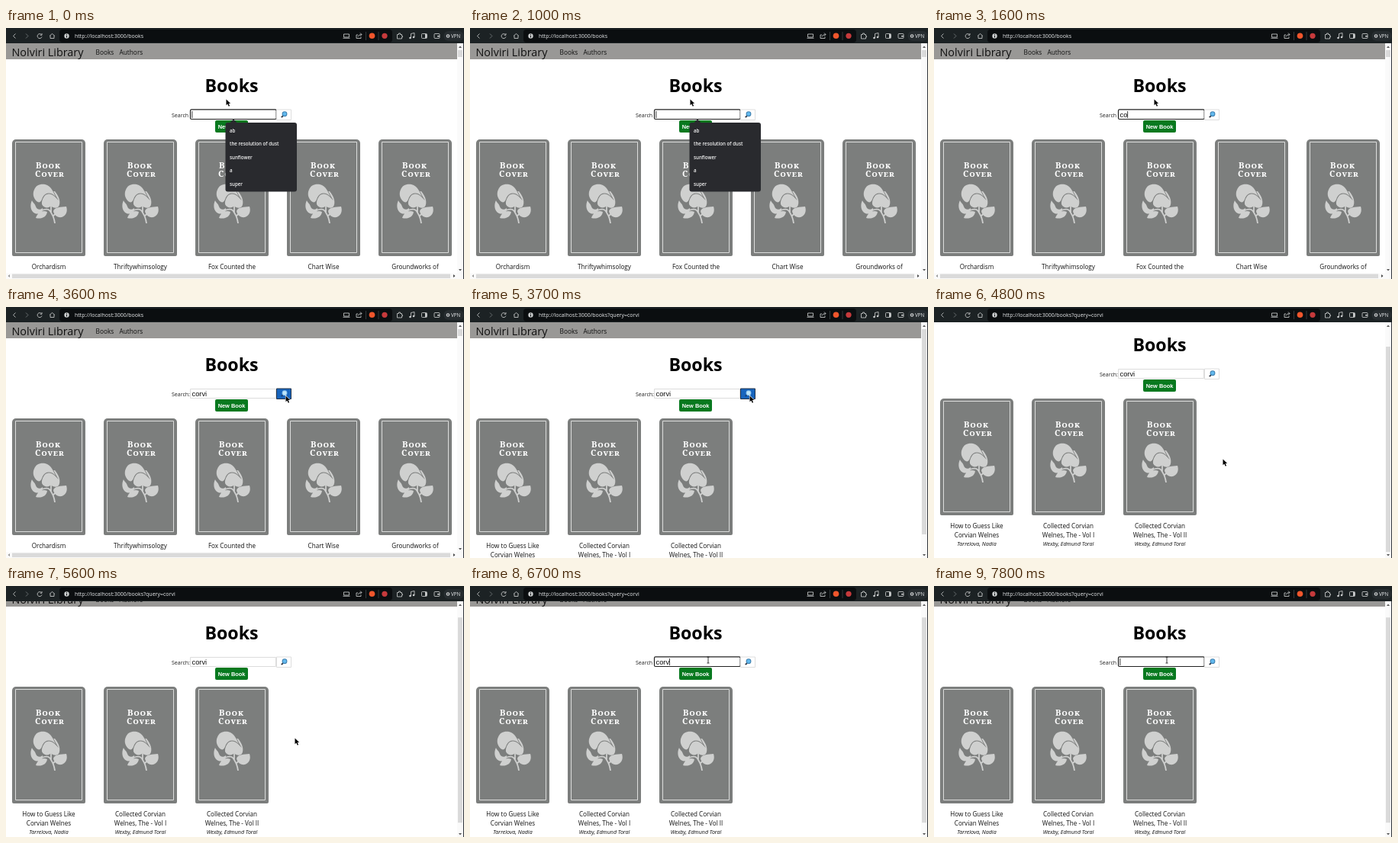
Animation, 600 px wide and 329 px high, one loop 8 s. Source, as an HTML page with a canvas:

```html
<!DOCTYPE html>
<html lang="en">
<head>
<meta charset="utf-8">
<title>Library search</title>
<style>
  html, body { margin: 0; height: 100%; overflow: hidden; background: #fff; }
  canvas { display: block; }
</style>
</head>
<body>
<canvas id="stage" width="600" height="329"></canvas>
<script>
const ctx = document.getElementById('stage').getContext('2d');
const SANS = '"Open Sans", "Noto Sans", sans-serif';
const ARIAL = '"Liberation Sans", sans-serif';
const SERIF = '"Noto Serif", serif';
const LOOP = 8000;
const QUERY = 'corvi';

const allBooks = [['Orchardism'], ['Thriftywhimsology'], ['Fox Counted the'], ['Chart Wise'], ['Groundworks of']];
const foundBooks = [
  ['How to Guess Like', 'Corvian Welnes', 'Tarrelova, Nadia'],
  ['Collected Corvian', 'Welnes, The - Vol I', 'Wexby, Edmund Toral'],
  ['Collected Corvian', 'Welnes, The - Vol II', 'Wexby, Edmund Toral'],
];
const suggestions = ['ab', 'the resolution of dust', 'sunflower', 'a', 'super'];

const heartLeaf = 'M64 214C70 221 72 229 69 234C66 237 61 236 59 233C56 237 49 236 47 231C46 224 52 217 57 214Z';
const curledLeaf = 'M37 212C39 205 48 203 54 206C61 210 62 216 65 221C59 215 52 215 48 222C46 228 44 230 40 227C35 222 35 216 37 212Z';
const lowLeaves = `M34 226C31 232 32 240 38 243C44 245 49 241 48 236C45 239 40 238 39 234C38 230 35 229 34 226Z
  M54 241C47 238 41 243 39 249C46 251 53 248 54 241Z
  M62 240C64 234 72 235 79 234C81 240 79 246 73 248C67 249 63 245 62 240Z`;
const stem = 'M47 239Q56 235 59 242Q63 248 64 256M59 233V242M62 246L68 241';
const arrow = new Path2D('M0 0V7.8L1.8 6.1L3.3 9.2L4.6 8.5L3.2 5.6H5.6Z');

function rect(x, y, w, h, fill, radius = 0, stroke, line = 1) {
  ctx.beginPath();
  ctx.roundRect(x, y, w, h, radius);
  if (fill) { ctx.fillStyle = fill; ctx.fill(); }
  if (stroke) { ctx.strokeStyle = stroke; ctx.lineWidth = line; ctx.stroke(); }
}

function text(str, x, y, font, color = '#111', align = 'left') {
  ctx.font = font;
  ctx.fillStyle = color;
  ctx.textAlign = align;
  ctx.fillText(str, x, y);
}

function stroke(d, color, width = 1) {
  ctx.strokeStyle = color;
  ctx.lineWidth = width;
  ctx.stroke(typeof d === 'string' ? new Path2D(d) : d);
}

function fill(d, color) {
  ctx.fillStyle = color;
  ctx.fill(typeof d === 'string' ? new Path2D(d) : d);
}

function dot(x, y, r, color) {
  ctx.beginPath();
  ctx.arc(x, y, r, 0, 7);
  ctx.fillStyle = color;
  ctx.fill();
}

// Value of the last [time, value] step already reached
const stepAt = (t, steps) => steps.reduce((v, [at, next]) => t >= at ? next : v, undefined);

function glide(t, start, end, from, to) {
  const p = Math.min(1, Math.max(0, (t - start) / (end - start)));
  return from.map((v, i) => v + (to[i] - v) * p);
}

function pointerAt(t) {
  if (t < 4100) return glide(t, 3000, 3400, [288.5, 93.5], [366.5, 116.5]);
  if (t < 5700) return glide(t, 4100, 4400, [366.5, 116.5], [378.5, 199.5]);
  if (t < 7800) return glide(t, 5700, 6200, [378.5, 199.5], [312, 97]);
  return [305, 97];
}

function sceneAt(t) {
  const typed = stepAt(t, [[0, 0], [1600, 2], [1700, 3], [1900, 4], [2000, 5],
    [6700, 4], [6800, 3], [6900, 1], [7000, 0]]);
  return {
    results: t >= 3700,
    value: QUERY.slice(0, typed),
    focused: t < 3600 || t >= 6200,
    caret: t < 3600 || (t >= 6200 && t < 7000) || t >= 7800,
    suggesting: t < 1600,
    hover: t >= 3400 && t < 4200,
    scroll: stepAt(t, [[0, 0], [4800, 26], [5600, 14]]),
    pointer: pointerAt(t),
    beam: t >= 6200,
  };
}

function drawBrowserBar(results) {
  const light = '#c9cbcc';
  const icon = (d, color = light) => stroke(d, color, 0.85);
  rect(0, 0, 600, 20, '#1c2224');
  rect(70, 2, 436, 17, '#0b0e10', 4);
  icon('M12.5 7.5L9.5 10.5L12.5 13.5');
  icon('M26 7.5L29 10.5L26 13.5', '#777c7e');
  icon('M46.5 8.8A3 3 0 1 0 47 11.5M47 7V9.3H44.7');
  icon('M57 10.5L60.5 7.5L64 10.5M58 10V13.5H63V10');
  dot(79.5, 10.5, 3.2, light);
  rect(79, 10, 1, 2.5, '#0b0e10');
  rect(79, 8.3, 1, 1, '#0b0e10');
  text('http://localhost:3000/books' + (results ? '?query=' + QUERY : ''), 90, 13, '7px ' + SANS, '#eceef0');
  icon('M442.5 8H449.5V12H442.5ZM441.5 13.3H450.5');
  icon('M461 9H459V13.5H465V11.5M461 11.5Q461.5 8.5 466 8.5M464 6.5L466 8.5L464 10.5');
  rect(471, 5, 1, 11, '#33393b');
  dot(479.5, 10.3, 3.8, '#f0562c');
  rect(487.5, 5, 1, 11, '#33393b');
  dot(496, 10.3, 3.6, '#c63a3c');
  icon('M512.5 8.5H514.5V7H516.5V8.5H518.5V10.5H519.5V12H518.5V14H512.5Z');
  icon('M530.5 13V7.5L535 6.5V12');
  dot(529.5, 13, 1.3, light);
  dot(534, 12, 1.3, light);
  rect(544.5, 7.5, 7, 6, null, 1, light, 0.85);
  rect(549, 8, 2, 5, light);
  rect(561, 7.5, 7, 6, null, 1, light, 0.85);
  rect(565, 10, 3, 1.5, light);
  rect(573.5, 4, 26, 13, '#272d30', 6);
  dot(579, 10.5, 2.3, light);
  dot(579, 10.5, 1, '#272d30');
  text('VPN', 583, 13, '6.3px ' + SANS, '#eceef0');
}

function drawBook(x, [title, more, author]) {
  const gray = '#7c7e7d', pale = '#cfd0cf';
  ctx.save();
  ctx.translate(x, 0);
  rect(8, 146, 96, 153, gray, [5, 5, 2, 2]);
  rect(12.5, 149.5, 87, 145, null, 0, '#dcdddc');
  ctx.letterSpacing = '0.8px';
  text('Book', 39, 184, `small-caps bold 11px ${SERIF}`, '#fff');
  text('Cover', 38, 195, `small-caps bold 11px ${SERIF}`, '#fff');
  ctx.letterSpacing = '0px';
  fill(heartLeaf, pale);
  stroke(curledLeaf, gray, 1.6);
  fill(curledLeaf, pale);
  fill(lowLeaves, pale);
  stroke(stem, pale, 1.8);
  text(title, 56, 316.3, '8.15px ' + SANS, '#111', 'center');
  if (more) {
    text(more, 56, 327.8, '8.15px ' + SANS, '#111', 'center');
    text(author, 56, 338.8, 'italic 7.1px ' + SANS, '#111', 'center');
  }
  ctx.restore();
}

function drawSearch(s) {
  text(s.focused ? 'Search' : 'Search:', 217, 116.5, '7px ' + SANS, '#222');
  if (s.focused) rect(241.5, 106.9, 112.7, 12.6, '#fff', 1.5, '#222', 1.2);
  else rect(241.5, 107.5, 112, 12, '#fff', 0, '#dcdcdc');
  text(s.value, 243.5, 116.5, '9.3px ' + ARIAL, '#111');
  if (s.caret) rect(243.5 + ctx.measureText(s.value).width, 109, 0.8, 9, '#111');

  rect(354.5, 107, 19, 13.5, s.hover ? '#1764bd' : '#fff', 0, s.hover ? '#24344a' : '#dedede');
  stroke('M363 115L360.8 117.2', s.hover ? '#1b3f70' : '#333a45', 1.8);
  dot(365, 112.7, 3.4, s.hover ? '#8fc6ee' : '#3f7fae');
  dot(365, 112.7, 2.4, s.hover ? '#bfe6fa' : '#62b9ee');

  rect(274, 121, 43, 16, '#08791f', 2);
  text('New Book', 295.5, 131.6, 'bold 7.4px ' + ARIAL, '#fff', 'center');
}

function drawSuggestions() {
  fill('M293 124.5L298 119.5L303 124.5Z', '#292a2e');
  rect(287.5, 124, 93.5, 90.5, '#292a2e', 3);
  suggestions.forEach((word, i) =>
    text(word, 293, 136.6 + i * 17.5, '600 6.2px ' + SANS, '#f4f4f4'));
}

function drawPage(s) {
  ctx.save();
  ctx.beginPath();
  ctx.rect(0, 20, 591, 309);
  ctx.clip();
  ctx.translate(0, -s.scroll);
  rect(0, 20, 591, 21, '#999896');
  text('Nolviri Library', 7.5, 36.8, '14.4px ' + SANS);
  text('Books', 117.5, 34.5, '8.3px ' + SANS);
  text('Authors', 148.5, 34.5, '8.3px ' + SANS);
  text('Books', 295.5, 84, 'bold 23.2px ' + SANS, '#000', 'center');
  drawSearch(s);
  (s.results ? foundBooks : allBooks).forEach((book, i) => drawBook(i * 120, book));
  if (s.suggesting) drawSuggestions();
  ctx.restore();
}

function drawScrollbars({ results, scroll }) {
  rect(591, 20, 8, 309, '#fafafa');
  fill('M593 26L595 23.5L597 26Z', '#555');
  const bottom = results ? 324 : 316;
  fill(`M593 ${bottom}H597L595 ${bottom + 2.5}Z`, '#555');
  rect(592, 29 + scroll * 0.88, 6, results ? 269 : 9, '#dadada');
  if (!results) {
    rect(0, 321.5, 599, 7.5, '#fafafa');
    rect(8, 322.5, 574, 5.5, '#dadada');
    fill('M5 323V327L2.5 325Z', '#999');
    fill('M586 323V327L588.5 325Z', '#444');
  }
  rect(599, 20, 1, 309, '#30343a');
}

function drawPointer({ pointer: [x, y], beam }) {
  ctx.save();
  ctx.translate(x, y);
  if (beam) {
    stroke('M0 -4V4M-1.5 -4H1.5M-1.5 4H1.5', '#222', 0.9);
  } else {
    stroke(arrow, '#fff', 1.2);
    fill(arrow, '#000');
  }
  ctx.restore();
}

function frame(now) {
  const scene = sceneAt(Math.floor(now % LOOP / 100) * 100);
  rect(0, 0, 600, 329, '#fff');
  drawPage(scene);
  drawScrollbars(scene);
  drawBrowserBar(scene.results);
  drawPointer(scene);
  requestAnimationFrame(frame);
}
requestAnimationFrame(frame);
</script>
</body>
</html>
```
